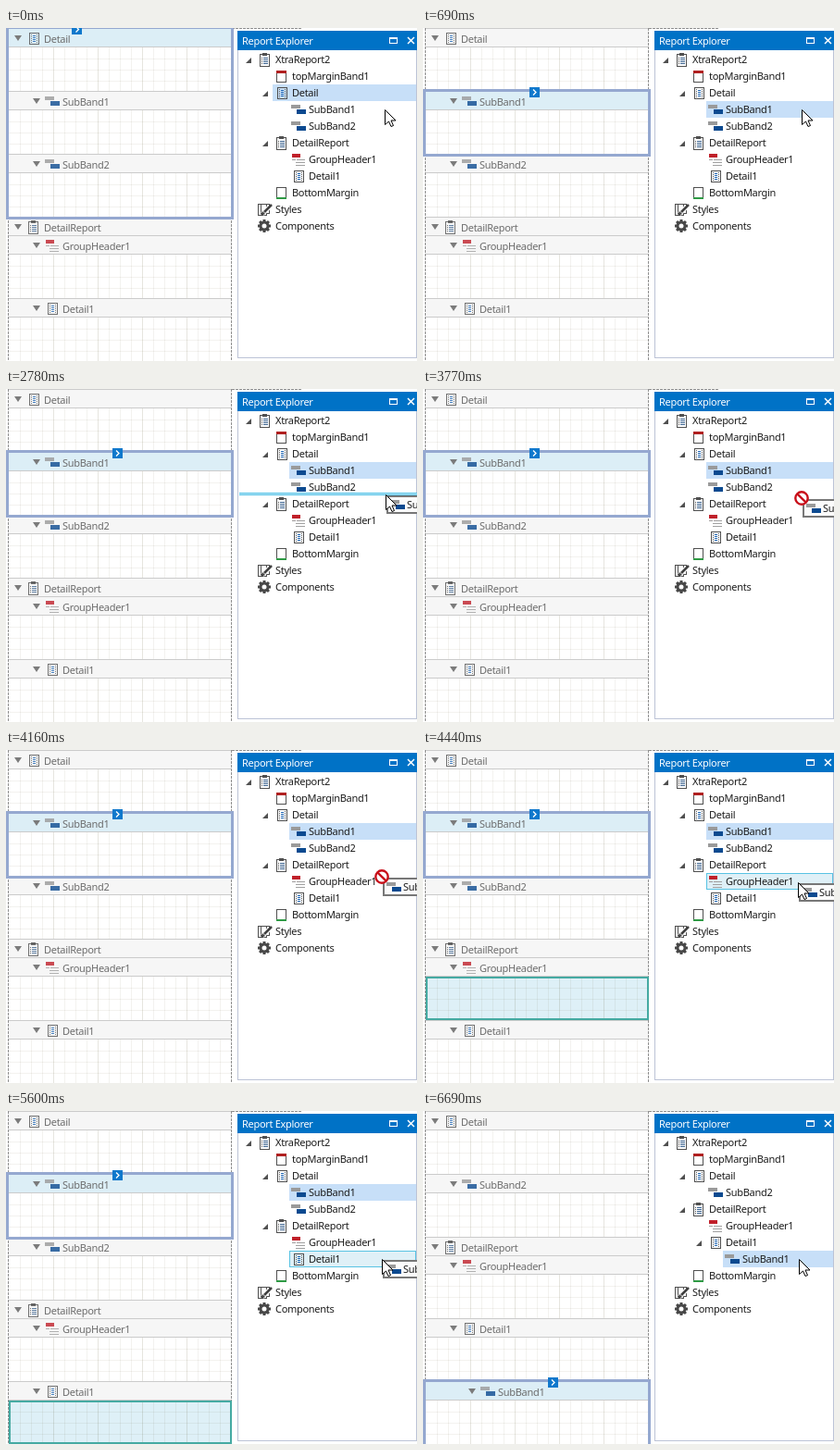
An HTML page with a canvas for the animation above (7720 ms loop, 444 by 360 pixels).

```html
<!DOCTYPE html>
<html lang="en">
<head>
<meta charset="utf-8">
<title>Report bands</title>
<style>
html, body { margin: 0; width: 100%; height: 100%; overflow: hidden; background: #fff; }
canvas { display: block; }
</style>
</head>
<body>
<canvas id="stage" width="444" height="360"></canvas>
<script>
const ctx = document.getElementById('stage').getContext('2d');
const LOOP = 7720, STEP = 30;
const SELECT = 690, DROP = 6460, DONE = 6660;

// Pointer path: time, x, y
const path = [
  [0, 409, 88], [2060, 409, 88], [2090, 408, 90], [2780, 410, 114],
  [3680, 410, 114], [4160, 406, 137], [4440, 405, 143],
  [5240, 405, 143], [5330, 405, 152], [5600, 406, 160], [LOOP, 406, 160]
];

// Designer bands: top, level, icon, label
const bandsBefore = [
  [1, 0, 'detail', 'Detail'], [69, 1, 'sub', 'SubBand1'], [137, 1, 'sub', 'SubBand2'],
  [205, 0, 'report', 'DetailReport'], [225, 1, 'group', 'GroupHeader1'], [293, 1, 'detail', 'Detail1']
];
const bandsAfter = [
  [1, 0, 'detail', 'Detail'], [69, 1, 'sub', 'SubBand2'], [137, 0, 'report', 'DetailReport'],
  [157, 1, 'group', 'GroupHeader1'], [225, 1, 'detail', 'Detail1'], [293, 2, 'sub', 'SubBand1']
];

// Tree rows: level, icon, label, expanded
const head = [[0, 'report', 'XtraReport2', 1], [1, 'top', 'topMarginBand1'], [1, 'detail', 'Detail', 1]];
const tail = [[1, 'bottom', 'BottomMargin'], [0, 'styles', 'Styles'], [0, 'gear', 'Components']];
const treeBefore = [...head,
  [2, 'sub', 'SubBand1'], [2, 'sub', 'SubBand2'], [1, 'report', 'DetailReport', 1],
  [2, 'group', 'GroupHeader1'], [2, 'detail', 'Detail1'], ...tail];
const treeAfter = [...head,
  [2, 'sub', 'SubBand2'], [1, 'report', 'DetailReport', 1], [2, 'group', 'GroupHeader1'],
  [2, 'detail', 'Detail1', 1], [3, 'sub', 'SubBand1'], ...tail];

function box(color, x, y, w, h) {
  ctx.fillStyle = color;
  ctx.fillRect(x, y, w, h);
}

function frame(color, x, y, w, h, lw = 1) {
  ctx.strokeStyle = color;
  ctx.lineWidth = lw;
  ctx.strokeRect(x + lw / 2, y + lw / 2, w - lw, h - lw);
}

function poly(points, fill, stroke) {
  ctx.beginPath();
  points.forEach(([x, y]) => ctx.lineTo(x, y));
  ctx.closePath();
  if (fill) { ctx.fillStyle = fill; ctx.fill(); }
  if (stroke) { ctx.strokeStyle = stroke; ctx.lineWidth = 1; ctx.stroke(); }
}

function line(color, lw, ...points) {
  ctx.beginPath();
  points.forEach(([x, y]) => ctx.lineTo(x, y));
  ctx.strokeStyle = color;
  ctx.lineWidth = lw;
  ctx.stroke();
}

function label(text, x, y, color) {
  ctx.font = '11px "Noto Sans", "Open Sans", sans-serif';
  ctx.letterSpacing = '-0.3px';
  ctx.textBaseline = 'alphabetic';
  ctx.fillStyle = color;
  ctx.fillText(text, x, y + 4);
}

const icons = {
  detail() {
    frame('#505050', 3, -6, 11, 13);
    for (let y = -4; y < 6; y += 2) {
      box('#606060', 5, y, 1, 1);
      box('#606060', 11, y, 1, 1);
    }
    for (const y of [-3, -1, 1, 3]) box('#1f66b5', 7, y, 3, 1);
  },
  report() {
    frame('#505050', 2, -6, 11, 14);
    box('#505050', 5, -7, 5, 3);
    for (const y of [-2, 0, 2, 4]) {
      box('#505050', 4, y, 1, 1);
      box('#3a628f', 6, y, 5, 1);
    }
  },
  sub() {
    box('#9a9a9a', 0, -5, 10, 4);
    box('#0c4a90', 6, 0, 10, 5);
  },
  group() {
    box('#c0202a', 1, -6, 9, 4);
    box('#a0a0a0', 1, 0, 4, 1);
    box('#a0a0a0', 6, 0, 9, 1);
    box('#a0a0a0', 5, 3, 10, 1);
    box('#a0a0a0', 5, 6, 10, 1);
  },
  top() {
    frame('#505050', 2, -5, 11, 12);
    box('#b02020', 2, -6, 11, 3);
  },
  bottom() {
    frame('#505050', 2, -6, 11, 12);
    box('#2f9a45', 2, 5, 11, 2);
  },
  styles() {
    frame('#505050', 0, -6, 10, 13);
    frame('#505050', 3, -6, 10, 11);
    line('#fff', 5, [5, 5], [13, -3]);
    line('#404040', 2.5, [7, 3], [15, -5]);
    poly([[3, 7], [5, 2], [8, 5]], '#404040');
  },
  gear() {
    for (let i = 0; i < 8; i++) {
      const a = i * Math.PI / 4, c = Math.cos(a), s = Math.sin(a);
      line('#484848', 3, [7 + 3 * c, 3 * s], [7 + 7 * c, 7 * s]);
    }
    ctx.beginPath();
    ctx.arc(7, 0, 4, 0, 7);
    ctx.lineWidth = 3;
    ctx.stroke();
  }
};

function icon(kind, x, y, alpha = 1) {
  ctx.save();
  ctx.translate(x, y);
  ctx.globalAlpha = alpha;
  icons[kind]();
  ctx.restore();
}

function grid(top, bottom) {
  for (let y = top + 12; y < bottom; y += 12) box('rgba(90, 80, 40, 0.07)', 3, y, 240, 1);
  for (let x = 15; x < 243; x += 12) {
    const alpha = (x - 3) % 48 ? 0.07 : 0.15;
    box(`rgba(90, 80, 40, ${alpha})`, x, top, 1, bottom - top);
  }
}

function drawBands(bands, selected, drop) {
  bands.forEach(([top, level, kind, text]) => {
    const x = 41 + 20 * level, y = top + 10;
    if (kind !== 'report') {
      if (text === drop) box('#def0f7', 3, top + 20, 240, 48);
      grid(top + 20, top + 68);
    }
    box(text === selected ? '#dceef6' : '#f6f6f6', 3, top, 240, 19);
    box('#cbcbcb', 3, top - 1, 240, 1);
    box('#cbcbcb', 3, top + 19, 240, 1);
    poly([[x - 32, y - 3], [x - 24, y - 3], [x - 28, y + 3]], '#7b7b7b');
    icon(kind, x - 19, y, 0.8);
    label(text, x, y + 1, '#6c6c6c');
  });
  for (let y = 0; y < 360; y += 4) {
    box('#909090', 2, y, 1, 3);
    box('#909090', 243, y, 1, 3);
  }
  for (let x = 244; x < 320; x += 4) box('#909090', x, 0, 3, 1);

  const target = bands.find(b => b[3] === drop);
  if (target) frame('#45aaa2', 3, target[0] + 20, 241, 47, 2);

  const [top, level] = bands.find(b => b[3] === selected);
  const whole = selected === 'Detail';
  const end = whole ? 205 : top + 68;
  frame('#95a8d0', 0, top - 3, 246, end - top + 5, 3);
  const bx = whole ? 77 : 100.5 + 20 * level;
  box('#0f78cc', Math.floor(bx - 5.5), top - 5, 11, 11);
  line('#fff', 1.3, [bx - 1.5, top - 2.5], [bx + 1.5, top + 0.5], [bx - 1.5, top + 3.5]);
}

function drawTree(rows, selected, hover) {
  box('#fff', 249, 3, 195, 354);
  frame('#bcc3d6', 250, 3, 194, 354);
  box('#0072c6', 250, 3, 194, 21);
  label('Report Explorer', 255, 14, '#fff');
  frame('#fff', 414, 10, 9, 7);
  box('#fff', 414, 10, 9, 2);
  line('#fff', 1.5, [434, 10], [441, 17]);
  line('#fff', 1.5, [441, 10], [434, 17]);

  rows.forEach(([level, kind, text, open], i) => {
    const y = 34 + 18 * i, x = 272 + 18 * level;
    if (text === selected) box('#c7dff8', x - 2, y - 9, 445 - x, 18);
    if (text === hover) {
      box('#dff0f7', x - 2, y - 9, 445 - x, 18);
      frame('#58c3e3', x - 2, y - 9, 445 - x, 18);
    }
    if (open) poly([[x - 7, y - 2], [x - 7, y + 4], [x - 13, y + 4]], '#505050');
    icon(kind, x, y);
    label(text, x + 19, y, '#1c1c1c');
  });
}

function drawGhost(x, y) {
  box('#fbfbfb', x + 1, y + 1, 60, 20);
  frame('#777', x + 1, y + 1, 60, 20, 2);
  icon('sub', x + 5, y + 11);
  label('SubBand1', x + 23, y + 11, '#1c1c1c');
}

function drawArrow(x, y) {
  const shape = [[0, 0], [0, 16], [4, 12.5], [6.5, 18], [9, 17], [6.5, 11.5], [11.5, 11.5]];
  poly(shape.map(([dx, dy]) => [x + dx + 0.5, y + dy + 0.5]), '#fff', '#000');
}

function drawForbidden(x, y) {
  ctx.beginPath();
  ctx.arc(x, y, 6.7, 0, 7);
  ctx.fillStyle = '#fff';
  ctx.fill();
  ctx.strokeStyle = '#c8101a';
  ctx.lineWidth = 2.4;
  ctx.stroke();
  line('#c8101a', 2.4, [x - 4.7, y - 4.7], [x + 4.7, y + 4.7]);
}

function pointer(t) {
  const i = path.findIndex(p => p[0] > t);
  const [t0, x0, y0] = path[i - 1], [t1, x1, y1] = path[i];
  const k = Math.floor((t - t0) / STEP) * STEP / (t1 - t0);
  return [Math.round(x0 + (x1 - x0) * k), Math.round(y0 + (y1 - y0) * k)];
}

function dropZone(y) {
  if (y > 155) return 'Detail1';
  if (y > 137 && y < 147) return 'GroupHeader1';
  if (y > 110 && y < 115) return 'line';
  return '';
}

function draw(t) {
  const [x, y] = pointer(t);
  const done = t >= DONE;
  const dragging = y > 92 && t < DROP;
  const zone = dropZone(y);
  const selected = t < SELECT ? 'Detail' : 'SubBand1';
  const target = y > 92 && !done ? zone : '';

  box('#fff', 0, 0, 444, 360);
  drawBands(done ? bandsAfter : bandsBefore, selected, target);
  drawTree(done ? treeAfter : treeBefore, selected, dragging ? target : '');
  if (dragging && zone === 'line') {
    box('#55c3e8', 252, 112, 192, 3);
    box('#b9e6f5', 252, 113, 192, 1);
  }
  if (dragging) drawGhost(x, y);
  if (dragging && !zone) drawForbidden(x, y);
  else drawArrow(x, y);
}

const start = performance.now();
function tick() {
  draw(Math.max(0, performance.now() - start) % LOOP);
  requestAnimationFrame(tick);
}
tick();
</script>
</body>
</html>
```
